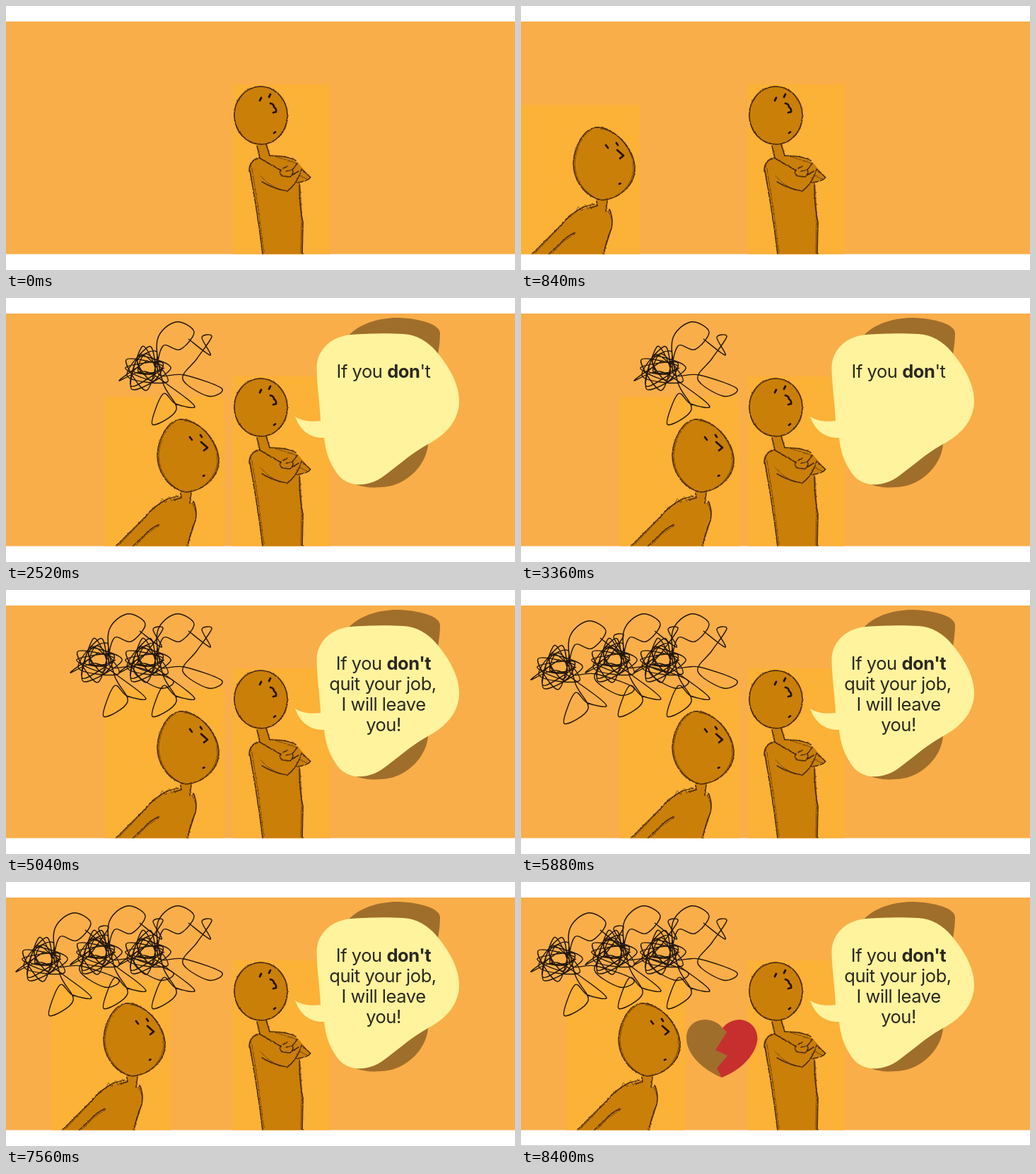
Recreate the animation shown at these times as an HTML page. Size 720 px wide and 374 px high, loop 9240 ms.

```html
<!DOCTYPE html>
<html lang="en">
<head>
<meta charset="utf-8">
<style>
  html, body { margin: 0; width: 100%; height: 100%; overflow: hidden; background: #fff; }
  svg { display: block; width: 720px; height: 374px; }
  text { font: 25.5px Inter, "Open Sans", sans-serif; letter-spacing: -.45px; fill: #2b2820; text-anchor: middle; }
  .bold { font-weight: 700; }
  .paper { fill: #fcb137; }
  .skin { fill: #ca7f09; }
  .pencil { fill: none; stroke: #4a2b09; stroke-width: 1.6; stroke-linecap: round; stroke-linejoin: round; filter: url(#rough); }
  .faint { stroke-width: 1; opacity: .65; }
  .face { fill: none; stroke: #241303; stroke-width: 2.8; stroke-linecap: round; stroke-linejoin: round; }
  .scribble { fill: none; stroke: #21160a; stroke-width: 1.4; }
  .cream { fill: #fff39d; }
  .brown { fill: #a06e2b; }
  .red { fill: #c72f2e; }
</style>
</head>
<body>
<svg viewBox="0 0 720 374">
  <defs>
    <filter id="rough" x="-10%" y="-10%" width="120%" height="120%">
      <feTurbulence type="fractalNoise" baseFrequency=".35" numOctaves="2" seed="4"/>
      <feDisplacementMap in="SourceGraphic" scale="2.4" xChannelSelector="R" yChannelSelector="G"/>
    </filter>
    <clipPath id="band"><rect y="22" width="720" height="329.500"/></clipPath>
    <path id="tiltedHead" d="M105 172C131 170 160 201 161 230C161 255 138 274 114 275C90 270 74 247 74 222C76 195 90 175 105 172Z"/>
    <ellipse id="roundHead" cx="360.500" cy="155" rx="37.500" ry="41"/>
    <path id="knot" class="scribble"/>
  </defs>

  <g clip-path="url(#band)">
    <rect width="720" height="374" fill="#f9ae49"/>

    <!-- leaning figure -->
    <g id="leaner" data-from="1">
      <rect class="paper" y="140" width="168.500" height="212"/>
      <path class="skin" d="M105 270L107 281L80 289Q68 296 60 307L15 353H117L126 321Q131 304 127 288L120 291L122 270Z"/>
      <use class="skin" href="#tiltedHead"/>
      <g class="pencil">
        <use href="#tiltedHead"/>
        <path class="faint" d="M100 175C84 185 78 203 76 222C76 246 90 263 104 271M112 174C137 176 157 203 159 226C160 246 148 262 134 269"/>
        <path d="M107 277L108 283L98 286M122 276L120 291M104 281Q88 283 78 291Q66 299 58 309L15 352M76 321Q62 328 56 336L39 352M125 288Q131 300 128 315Q120 334 117 352"/>
        <path class="faint" d="M101 279L95 288L90 281L86 290L81 284L77 293M70 295L57 311L20 350M123 290Q133 305 126 322L121 338M77 322L60 334L44 350"/>
      </g>
      <path class="face" d="M120 197L123 201M135 194L137 197M136 204L145 212L140 216M139 252L140.500 251.500"/>
    </g>

    <!-- figure with folded arms -->
    <rect class="paper" x="321" y="111" width="137" height="241"/>
    <path class="skin" d="M355 193H369L373 212Q397 212 413 222L431 243L415 251Q415 280 420 305L419 353H363Q361 305 353 278L344 232Q345 217 359 215Z"/>
    <use class="skin" href="#roundHead"/>
    <g class="pencil">
      <use href="#roundHead"/>
      <use class="faint" href="#roundHead" transform="rotate(-12 360 155)"/>
      <path d="M355 198L359 215M368 196L373 212M345 233L353 280Q359 315 363 352M415 252Q415 285 420 306L419 352"/>
      <path d="M344 234Q344 218 358 215L370 222L389 233M373 212Q398 212 410 219M418 231L431 243Q425 249 412 250M362 249Q380 260 398 262Q411 253 418 232"/>
      <path d="M389 232Q385 238 392 241L402 242Q408 237 405 232L396 234M392 230L398 227M405 232L412 223M404 240L414 234"/>
      <path class="faint" d="M348 230L356 282L365 350M346 230Q346 219 356 217M380 213L412 223M414 240L428 246M416 254L418 290L417 350M360 240Q370 254 388 260"/>
    </g>
    <path class="face" d="M361 130L359 134M374 125L372 129M374 138Q379 139 379 143Q383 146 382 150L378 151M379 180L381 178.500"/>
  </g>

  <!-- speech bubble -->
  <g data-from="2">
    <path class="brown" d="M483 55C500 35 530 28 555 28C585 29 614 37 614 50Q614 62 611 80L597 207C595 235 570 262 540 267C520 270 505 268 495 264Z"/>
    <path class="cream" d="M439.500 100C439 72 462 54 488 52C520 50 540 50 562 51C581 52 597 62 608 75C625 95 641 120 641 146C641 175 620 195 597 207C570 222 552 240 532 254C510 269 480 269 466 245C455 228 452 215 450 198C431 199 416 188 409 168C418 174 430 176 445 174C444 150 440 125 439.500 100Z"/>
  </g>
  <text data-from="3" data-to="6" x="534" y="113">If you <tspan class="bold">don</tspan>'t</text>
  <g data-from="6">
    <text x="534" y="113">If you <tspan class="bold">don't</tspan></text>
    <text x="533" y="142">quit your job,</text>
    <text x="534" y="171">I will leave</text>
    <text x="534" y="200">you!</text>
  </g>

  <!-- growing tangle -->
  <use href="#knot" data-from="3"/>
  <use href="#knot" x="-69" data-from="5"/>
  <use href="#knot" x="-146" y="10" data-from="7"/>

  <!-- broken heart -->
  <g data-from="10">
    <path class="brown" d="M284 277C262 268 234 247 234 221C234 204 247 195 260 195C272 195 281 201 285 207L291 213L292 246Z"/>
    <path class="red" d="M284 277C308 268 332 247 334.500 223C335 208 325 196 309 195C301 195 291 199 285 207L291 213L275 238L292 246L277 264Z"/>
    <rect y="373" width="720" height="1" fill="#c8c8c8"/>
  </g>
</svg>

<script>
const STEP = 840, STEPS = 11;
const leaner = document.getElementById('leaner');
const timed = [...document.querySelectorAll('[data-from]')];

// Dense whorl on the left of the tangle
const whorl = Array.from({ length: 26 }, (_, i) => [
  199 + Math.cos(2.2 * i) * (25 + 12 * Math.sin(1.3 * i)),
  99 + Math.sin(2.2 * i) * (23 + 15 * Math.cos(.9 * i))
]);
// Wide loops that run out of it to the right
const sweep = [
  [160, 117], [196, 104], [236, 128], [267, 154], [240, 150], [222, 136],
  [207, 179], [241, 158], [222, 120], [214, 60], [240, 34], [266, 48],
  [246, 73], [222, 68], [216, 108], [252, 109], [305, 128], [286, 139],
  [250, 115], [270, 86], [291, 55], [277, 56], [289, 81], [258, 58]
];

// Catmull-Rom curve through the points
function smooth(points) {
  const at = i => points[Math.max(0, Math.min(points.length - 1, i))];
  const ctrl = (p, a, b, k) => p.map((v, j) => v + (b[j] - a[j]) * k);
  let d = 'M' + points[0];
  for (let i = 0; i < points.length - 1; i++) {
    const c1 = ctrl(at(i), at(i - 1), at(i + 1), 1 / 6);
    const c2 = ctrl(at(i + 1), at(i), at(i + 2), -1 / 6);
    d += `C${c1} ${c2} ${at(i + 1)}`;
  }
  return d;
}
document.getElementById('knot').setAttribute('d', smooth([...whorl, ...sweep]));

// Leans in step by step, then backs off
function leanerX(step) {
  if (step < 2) return 0;
  return step > 2 && step < 8 ? 140 : 64;
}

const start = performance.now();
function draw() {
  const step = Math.floor((performance.now() - start) / STEP) % STEPS;
  for (const el of timed) {
    const { from, to = STEPS } = el.dataset;
    el.style.display = step >= +from && step < +to ? '' : 'none';
  }
  leaner.setAttribute('transform', `translate(${leanerX(step)} 0)`);
  requestAnimationFrame(draw);
}
draw();
</script>
</body>
</html>
```
